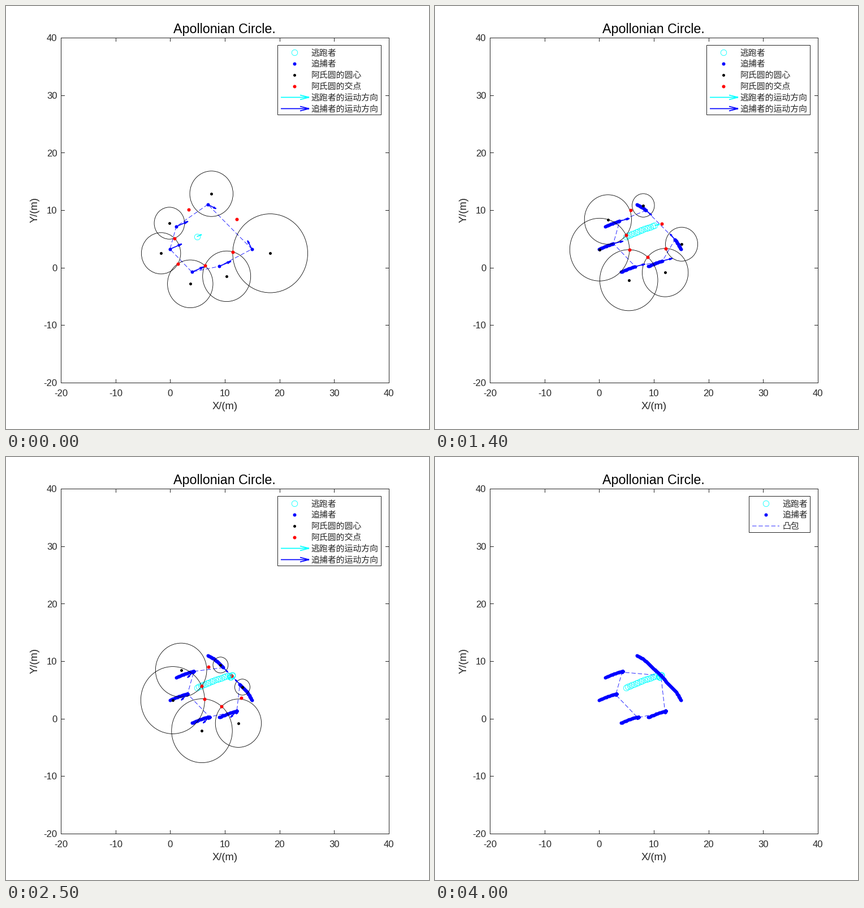
A matplotlib script for the animation above (5 s loop, 748x748 px).

```python
import numpy as np
import matplotlib.pyplot as plt
from matplotlib.animation import FuncAnimation
from matplotlib.patches import Ellipse, Rectangle

SIZE, DPI = 748, 100
PT = 72 / DPI                       # points per pixel
INK, THIN = "#262626", 0.83
LEFT, RIGHT = 0.13 * SIZE, 0.905 * SIZE
TOP, BOTTOM = 0.075 * SIZE, 0.89 * SIZE
SCALE = np.array([(RIGHT - LEFT) / 60, -(BOTTOM - TOP) / 60])
ORIGIN = np.array([LEFT, BOTTOM]) + 20 * SCALE

CAPTURE, FRAMES = 40, 50
ARRIVAL = 17                        # evader reaches the gap, then dithers
EVADER_STEP, CHASER_STEP, CLOSER_STEP = 0.4, 0.2, 0.143
DITHER = np.array([0.73, 0.683])
CLOSERS = (0, 5)                    # the two chasers guarding the gap

EVADER_START = np.array([4.88, 5.39])
CHASER_START = np.array([[6.87, 10.98], [1.10, 7.14], [-0.05, 3.21],
                         [3.96, -0.78], [8.96, 0.21], [14.94, 3.21]])


def to_px(points):
    return ORIGIN + np.asarray(points) * SCALE


def pixel(value):
    """Centre of the pixel that a crisp line falls on."""
    return round(value) + 0.5


def unit(v):
    return v / max(np.hypot(*v), 1e-9)


def apollonius(chasers, evader):
    """Circles of points twice as near to the chaser as to the evader."""
    gap = chasers - evader
    return chasers + gap / 3, np.hypot(*gap.T) * 2 / 3


def crossing(c1, r1, c2, r2, evader):
    """Circle intersection nearest the evader, or the radical foot."""
    dist = max(np.hypot(*(c2 - c1)), 1e-9)
    along = (c2 - c1) / dist
    a = (dist**2 + r1**2 - r2**2) / (2 * dist)
    h = np.sqrt(max(r1**2 - a**2, 0))
    side = h * np.array([-along[1], along[0]])
    foot = c1 + a * along
    return min(foot + side, foot - side, key=lambda p: np.hypot(*(p - evader)))


def simulate():
    evader, chasers = EVADER_START.copy(), CHASER_START.copy()
    heading, states = None, []
    for n in range(CAPTURE + 1):
        centres, radii = apollonius(chasers, evader)
        cross = np.array([crossing(centres[i], radii[i], centres[(i + 1) % 6],
                                   radii[(i + 1) % 6], evader) for i in range(6)])
        gap = cross[-1]
        if n < ARRIVAL - 1:
            heading = unit(gap - evader)
        elif n >= ARRIVAL:
            heading = unit(DITHER) * (-1 if n % 2 else 1)
        moves = np.tile(heading * CHASER_STEP, (6, 1))
        steps = moves.copy()
        for i in CLOSERS:
            to_gap = gap - chasers[i]
            moves[i] = unit(to_gap) * CLOSER_STEP
            steps[i] = unit(to_gap) * min(CLOSER_STEP, np.hypot(*to_gap))
        states.append(dict(evader=evader, chasers=chasers, centres=centres, radii=radii,
                           cross=cross, heading=heading, moves=moves))
        evader = evader + heading * EVADER_STEP
        chasers = chasers + steps
    return states


def arrow_path(start, end):
    """Shaft and open head, in pixels, ending with a break."""
    start, end = np.asarray(start, float), np.asarray(end, float)
    v = end - start
    normal = np.array([-v[1], v[0]]) * 0.08
    back = end - 0.32 * v
    gap = [np.nan, np.nan]
    return np.array([start, end, gap, back + normal, end, back - normal, gap])


states = simulate()
evader_trail = to_px([s["evader"] for s in states])
chaser_trail = to_px([s["chasers"] for s in states])

fig = plt.figure(figsize=(SIZE / DPI, SIZE / DPI), dpi=DPI, facecolor="white")
ax = fig.add_axes([0, 0, 1, 1])
ax.set(xlim=(0, SIZE), ylim=(SIZE, 0))
ax.axis("off")


def line(xs, ys, color=INK, width=1.0, **kw):
    return ax.plot(xs, ys, color=color, lw=width * PT, snap=False, **kw)[0]


def dots(color, diameter, xs=(), ys=(), **kw):
    return ax.plot(xs, ys, ls="none", marker="o", ms=diameter * PT, mfc=color,
                   mec="none", **kw)[0]


def rings(xs=(), ys=(), **kw):
    return ax.plot(xs, ys, ls="none", marker="o", ms=10.4 * PT, mfc="none",
                   mec="cyan", mew=THIN * PT, **kw)[0]


def arrows(color, zorder):
    return line([], [], color, 1.67, zorder=zorder, solid_joinstyle="miter",
                solid_capstyle="butt")


def box(left, top, right, bottom, **kw):
    x, y = pixel(left), pixel(top)
    return ax.add_patch(Rectangle((x, y), pixel(right) - x, pixel(bottom) - y,
                                  ec=INK, lw=PT, snap=False, **kw))


def label(x, y, text, size, color=INK, font="Liberation Sans", **kw):
    return ax.text(x, y, text, fontsize=size * PT, color=color, family=font, **kw)


def draw_frame():
    box(LEFT, TOP, RIGHT, BOTTOM, fill=False, zorder=1)
    for value in range(-20, 41, 10):
        x, y = to_px([value, value])
        px, py = pixel(x), pixel(y)
        for edge, inward in ((BOTTOM, -6), (TOP, 6)):
            line([px, px], [pixel(edge), pixel(edge) + inward])
        for edge, inward in ((LEFT, 6), (RIGHT, -6)):
            line([pixel(edge), pixel(edge) + inward], [py, py])
        label(x, 690, str(value), 16.67, ha="center")
        label(90.5, y + 6.3, str(value), 16.67, ha="right")
    label(386.7, 48, "Apollonian Circle.", 23.3, "black", ha="center")
    label(387, 713, "X/(m)", 18.33, ha="center")
    label(51, 360.5, "Y/(m)", 18.33, rotation=90, ha="center", va="center")


DASH = (0, (9, 4.5))


def legend(left, bottom, rows):
    """Rows are (y, kind, colour, text); returns the artists."""
    items = [box(left, 69, 663, bottom, fc="white", zorder=20)]
    mid = left + 30
    for y, kind, color, text in rows:
        if kind == "ring":
            items.append(rings([mid], [y], zorder=21))
        elif kind == "dash":
            items.append(line([left + 6, left + 54], [y, y], color, THIN,
                              ls=DASH, zorder=21))
        elif kind == "arrow":
            mark = arrows(color, 21)
            mark.set_data(*arrow_path((left + 6, y), (left + 56, y)).T)
            items.append(mark)
        else:
            items.append(dots(color, kind, [mid], [y], zorder=21))
        items.append(label(left + 59.5, y + 5.4, text, 14.9, INK,
                           "Noto Sans CJK JP", zorder=21))
    return items


draw_frame()
chase_legend = legend(480, 192, [
    (82, "ring", "cyan", "逃跑者"),
    (101.5, 6, "blue", "追捕者"),
    (121.5, 5, "black", "阿氏圆的圆心"),
    (141.5, 6, "red", "阿氏圆的交点"),
    (161.5, "arrow", "cyan", "逃跑者的运动方向"),
    (181.5, "arrow", "blue", "追捕者的运动方向")])
final_legend = legend(555, 133, [
    (82, "ring", "cyan", "逃跑者"),
    (101.5, 6, "blue", "追捕者"),
    (122, "dash", "blue", "凸包")])

hull = line([], [], "blue", THIN, ls=DASH, zorder=4)
evader_marks = rings(zorder=5)
chaser_marks = dots("blue", 6, zorder=6)
circles = [ax.add_patch(Ellipse((0, 0), 1, 1, fill=False, ec="black",
                                lw=THIN * PT, zorder=7)) for _ in range(6)]
centre_marks = dots("black", 5, zorder=8)
cross_marks = dots("red", 6, zorder=9)
evader_arrow = arrows("cyan", 10)
chaser_arrows = arrows("blue", 11)
chase_only = [*chase_legend, *circles, centre_marks, cross_marks,
              evader_arrow, chaser_arrows]


def update(frame):
    n = min(frame, CAPTURE)
    s = states[n]
    chasing = n < CAPTURE
    for artist in chase_only:
        artist.set_visible(chasing)
    for artist in final_legend:
        artist.set_visible(not chasing)

    evader_marks.set_data(*evader_trail[:n + 1].T)
    chaser_marks.set_data(*chaser_trail[:n + 1].reshape(-1, 2).T)
    corners = chaser_trail[n]
    hull.set_data(*np.vstack([corners, corners[:1]]).T)

    for circle, centre, r in zip(circles, to_px(s["centres"]), s["radii"]):
        circle.set_center(centre)
        circle.width, circle.height = 2 * r * abs(SCALE)
    centre_marks.set_data(*to_px(s["centres"]).T)
    cross_marks.set_data(*to_px(s["cross"]).T)

    # Arrow length follows the spread of the chasers.
    spread = np.hypot(*np.ptp(s["chasers"], axis=0)) / np.sqrt(6)
    ends = s["chasers"] + s["moves"] * 0.3 * spread / CHASER_STEP
    chaser_arrows.set_data(*np.vstack(
        [arrow_path(a, b) for a, b in zip(corners, to_px(ends))]).T)
    tip = to_px(s["evader"] + 0.9 * s["heading"])
    evader_arrow.set_data(*arrow_path(evader_trail[n], tip).T)
    return []


anim = FuncAnimation(fig, update, frames=FRAMES, interval=100,
                     init_func=lambda: update(0), repeat=True, repeat_delay=0)
plt.show()
```
